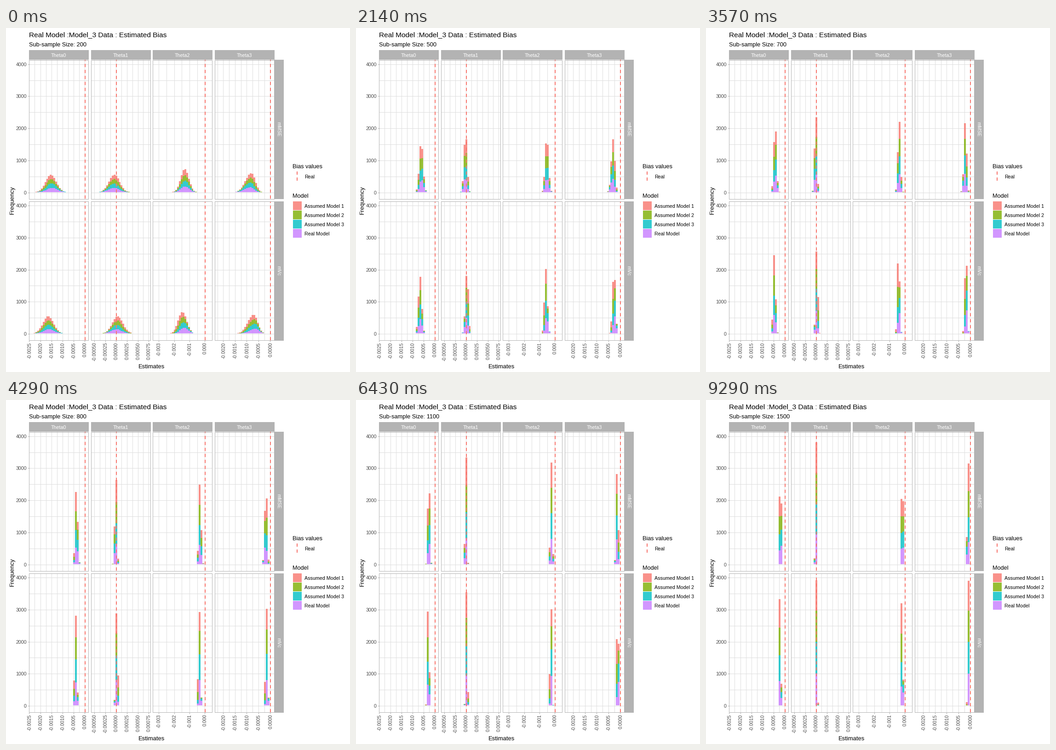
Write a matplotlib script that moves like this. It is 748 px wide and 748 px high and loops after 10000 ms.

```python
import math

import matplotlib.pyplot as plt
import numpy as np
from matplotlib.animation import FuncAnimation
from matplotlib.collections import LineCollection, PolyCollection
from matplotlib.patches import Rectangle

SIZE, DPI = 748, 88
PT = 72 / DPI                      # points per pixel
LOOP, TICK, STEPS = 10000, 40, 14

plt.rcParams["font.family"] = "Liberation Sans"

MODELS = ["Assumed Model 1", "Assumed Model 2", "Assumed Model 3", "Real Model"]
FILLS = ["#F8766D", "#7CAE00", "#00BFC4", "#C77CFF"]
GREY, GRID, TICK_TEXT = "#B3B3B3", "#DEDEDE", "#4D4D4D"

# Panel layout in pixels, y pointing down
PANEL_W, PANEL_H, BIN, PER_1000 = 129, 302, 3.9, 69.7
LEFTS = [math.floor(50.5 + 134.7 * col) for col in range(4)]
TOPS = [69, 376.5]
ZERO_X = [171.4, 239.7, 432.8, 574.9]
ZERO_Y = [357, 664.4]

# Per column: pixels and value of one axis step
STEP_PX = [24.1, 23.7, 33.4, 25.5]
STEP_LABEL = [("%.4f", 0.0005), ("%.5f", 0.00025), ("%.3f", 0.001), ("%.4f", 0.0005)]

# Bias at size 200 in bins, its change from model to model, and the spread;
# all shrink with the sub-sample size
CENTRE = [[-18.9, -1.05, -11.3, -9.25], [-20.4, 0.8, -12.6, -7.95]]
DRIFT = [[0.35, -0.15, 0.1, -0.45], [0.3, -0.45, 0.68, 0.65]]
SPREAD = [[2.05, 1.41, 2.15, 2.0], [1.5, 1.15, 1.3, 1.12]]
START_SPREAD = [2.9, 2.9, 2.2, 2.6]
SKEW = [0, 0, 0, 0.22]

phi = np.vectorize(lambda z: 0.5 * (1 + math.erf(z / math.sqrt(2))))
edges = np.arange(-32, 16) - 0.5


def counts(row, col, model, size):
    """Bin counts of 1000 estimates from a two-piece normal curve."""
    u = 200 / size
    a = SPREAD[row][col]
    s = a * u + (START_SPREAD[col] - a) * u * u
    k = SKEW[col] * math.sqrt(u)
    mean = (CENTRE[row][col] + DRIFT[row][col] * (model - 1.5)) * u - 10 * SKEW[col] * u * u
    z = (edges - mean - 1.6 * k * s) / s
    cdf = np.where(z < 0, (1 + k) * phi(z / (1 + k)),
                   1 - (1 - k) * phi(-z / (1 - k)))
    return np.round(1000 * np.diff(cdf))


def bars(size):
    """Stacked bars of every panel, one list of corners per model."""
    out = [[] for _ in MODELS]
    for row, zero_y in enumerate(ZERO_Y):
        for col, zero_x in enumerate(ZERO_X):
            base = np.zeros(len(edges) - 1)
            for m in reversed(range(len(MODELS))):
                top = base + counts(row, col, m, size)
                for i in np.flatnonzero(top > base):
                    x1 = zero_x + edges[i] * BIN
                    x2 = x1 + BIN
                    y1, y2 = (zero_y - v[i] * PER_1000 / 1000 for v in (base, top))
                    out[m].append([(x1, y1), (x2, y1), (x2, y2), (x1, y2)])
                base = top
    return out


fig = plt.figure(figsize=(SIZE / DPI, SIZE / DPI), dpi=DPI, facecolor="white")
ax = fig.add_axes([0, 0, 1, 1])
ax.set_xlim(0, SIZE)
ax.set_ylim(SIZE, 0)
ax.axis("off")


def rect(x, y, w, h, z=1, **style):
    ax.add_patch(Rectangle((x, y), w, h, zorder=z, antialiased=False, **style))


def dashed(x, bottom, top):
    ax.plot([x, x], [bottom, top], color=FILLS[0], lw=2 * PT, zorder=4,
            dashes=(3.2, 3.2), dash_capstyle="butt", antialiased=False)


def text(x, y, s, px=10.6, color="black", ha="left", va="baseline", rot=0):
    return ax.text(x, y, s, fontsize=px * PT, color=color, ha=ha, va=va,
                   rotation=rot, zorder=6)


def mid(v):
    return math.floor(v) + 0.5


grid, ticks = [], []


def vline(lines, x, y1, y2):
    lines.append([(mid(x), y1), (mid(x), y2)])


def hline(lines, y, x1, x2):
    lines.append([(x1, mid(y)), (x2, mid(y))])


def draw_panel(row, col):
    left, top = LEFTS[col], TOPS[row]
    right, bottom = left + PANEL_W, top + PANEL_H
    zero, step = ZERO_X[col], STEP_PX[col]
    for half in range(-12, 13):
        x = zero + half * step / 2
        if left < x < right:
            vline(grid, x, top, bottom)
            if row == 1 and half % 2 == 0:
                label, value = STEP_LABEL[col]
                vline(ticks, x, bottom, bottom + 3)
                text(x + 0.3, 683.5, label % (half // 2 * value), 10.4, TICK_TEXT,
                     "center", "top", 90)
    for half in range(9):
        y = ZERO_Y[row] - half * PER_1000 / 2
        hline(grid, y, left, right)
        if col == 0 and half % 2 == 0:
            hline(ticks, y, left - 2, left + 1)
            text(45, y + 4.6, str(half * 500), color=TICK_TEXT, ha="right")
    dashed(round(zero + 0.3), bottom, top)
    rect(left + 0.5, mid(top), PANEL_W, PANEL_H, z=5, fill=False, ec=GREY, lw=PT)


for col, left in enumerate(LEFTS):
    rect(left, 48, PANEL_W + 1, 21, fc=GREY, lw=0)
    text(left + PANEL_W / 2, 63, f"Theta{col}", color="white", ha="center")
    for row in range(2):
        draw_panel(row, col)
for top, name in zip(TOPS, ("mMSE", "mVc")):
    rect(583, top, 21, PANEL_H + 1, fc=GREY, lw=0)
    text(592.5, top + PANEL_H / 2, name, color="white", ha="center", va="center", rot=-90)
for lines, color in ((grid, GRID), (ticks, GREY)):
    ax.add_collection(LineCollection(lines, colors=color, linewidths=PT,
                                     antialiaseds=False, zorder=1), autolim=False)

text(50, 19, "Real Model :Model_3 Data : Estimated Bias", 15.5)
subtitle = text(50, 39.5, "", 12.8)
text(317, 740, "Estimates", 13, ha="center")
text(14, 374, "Frequency", 13, ha="center", va="center", rot=90)

text(623, 305, "Bias values", 12.8)
dashed(633, 331.5, 311)
text(649, 327, "Real")
text(623, 369, "Model", 12.8)

stacks = []
for i, (name, fill) in enumerate(zip(MODELS, FILLS)):
    y = 377 + 20 * i
    rect(624, y, 19, 19, fc=fill, alpha=0.8, lw=0)
    text(649, y + 14, name)
    stack = PolyCollection([], facecolors=fill, edgecolors="none", alpha=0.8,
                           antialiaseds=False, zorder=3)
    ax.add_collection(stack, autolim=False)
    stacks.append(stack)

SIZES = [200 + 100 * i for i in range(STEPS)]
BARS = [bars(size) for size in SIZES]


def update(i):
    # a step shows from the tick in which it begins
    step = ((i + 1) * TICK - 1) * STEPS // LOOP
    subtitle.set_text(f"Sub-sample Size: {SIZES[step]}")
    for stack, verts in zip(stacks, BARS[step]):
        stack.set_verts(verts)
    return [subtitle, *stacks]


anim = FuncAnimation(fig, update, frames=LOOP // TICK, init_func=lambda: update(0),
                     interval=TICK, repeat=True, repeat_delay=0, blit=False)
plt.show()
```
